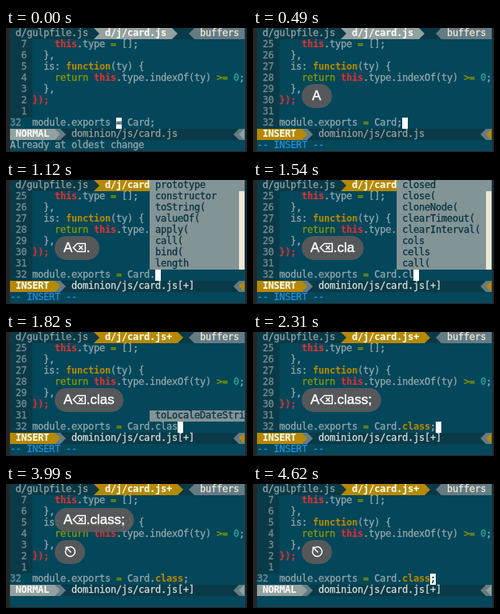
An HTML page with a canvas that plays this animation: 302x155 px, repeating every 4830 ms.

```html
<!DOCTYPE html>
<html lang="en">
<head>
<meta charset="utf-8">
<title>Vim session</title>
<style>
html, body { margin: 0; width: 100%; height: 100%; overflow: hidden; background: #262626; }
canvas { display: block; width: 302px; height: 155px; }
</style>
</head>
<body>
<canvas id="stage" width="302" height="155"></canvas>
<script>
const ctx = document.getElementById('stage').getContext('2d');
const LOOP = 4830, LEFT = 5, CW = 7, CH = 14, BASE = 10;
const MONO = '12px "DejaVu Sans Mono", monospace';
const SANS = '17px "Liberation Sans", Arial, sans-serif';
const C = {
  frame: '#262626', bg: '#04465a', dark: '#0a3a48', text: '#93a7a9', dim: '#748b91', white: '#fdfbf2',
  grey: '#93a1a1', slate: '#657b83', yellow: '#b58900', red: '#e0322f',
  green: '#8a9c00', cyan: '#2aa198', blue: '#268bd2', menu: '#839496', cream: '#eee8d5'
};

// Source lines: runs of [text, colour, bold]
const CODE = [
  [['    '], ['this', C.red, true], ['.type '], ['=', C.green], [' [];']],
  [['  },']],
  [['  is: '], ['function', C.yellow, true], ['(ty) {']],
  [['    '], ['return ', C.green], ['this', C.red, true], ['.type.indexOf(ty) '], ['>=', C.green], [' '], ['0', C.cyan], [';']],
  [['  },']],
  [['});', C.red, true]],
  [['']]
];

const MEMBERS = ['prototype', 'constructor', 'toString(', 'valueOf(', 'apply(', 'call(', 'bind(', 'length'];
const MATCH_C = ['closed', 'close(', 'constructor', 'cloneNode(', 'concat(', 'cols', 'cells', 'call('];
const MATCH_CL = ['closed', 'close(', 'cloneNode(', 'clearTimeout(', 'clearInterval(', 'cols', 'cells', 'call('];
const MATCH_CLA = ['clearTimeout(', 'clearInterval(', 'toLocaleString(', 'toLocaleDateStr', 'toLocaleTimeStr',
  'toLocaleLowerCa', 'toLocaleUpperCa', 'localeCompare('];

const menu = (col, width, ...items) => ({ col, width, items });

// Editor state: each step overrides what came before it
const STEPS = [
  [0, { insert: false, relative: true, changed: false, tail: 'Card;', cursor: 15, message: 'Already at oldest change', keys: '', menu: null }],
  [490, { insert: true, relative: false, cursor: 22, message: '-- INSERT --', keys: 'A' }],
  [700, { keys: 'A⌫' }],
  [770, { changed: true, tail: 'Card', cursor: 21 }],
  [840, { menu: menu(20, 16, 'Card') }],
  [1120, { keys: 'A⌫.', tail: 'Card.', cursor: 22, menu: menu(25, 17, ...MEMBERS) }],
  [1260, { keys: 'A⌫.c' }],
  [1330, { tail: 'Card.c', cursor: 23, menu: menu(25, 17, ...MATCH_C) }],
  [1470, { keys: 'A⌫.cl' }],
  [1540, { keys: 'A⌫.cla', tail: 'Card.cl', cursor: 24, menu: menu(25, 17, ...MATCH_CL) }],
  [1610, { tail: 'Card.cla', cursor: 25, menu: menu(25, 17, ...MATCH_CLA) }],
  [1750, { keys: 'A⌫.clas' }],
  [1820, { tail: 'Card.clas', cursor: 26, menu: menu(25, 17, 'toLocaleDateStri') }],
  [1960, { keys: 'A⌫.class', tail: 'Card.class', cursor: 27, menu: null }],
  [2310, { keys: 'A⌫.class;', tail: 'Card.class;', cursor: 28 }],
  [2870, { escape: true }],
  [2940, { cursor: 27, message: '' }],
  [3990, { insert: false, relative: true, cursor: -1 }],
  [4060, { cursor: 27 }]
];

const stateAt = t => Object.assign({}, ...STEPS.filter(s => s[0] <= t).map(s => s[1]));
const colX = col => LEFT + col * CW;

function block(col, row, width, color, height = 1) {
  ctx.fillStyle = color;
  ctx.fillRect(colX(col), row * CH, width * CW, height * CH);
}

// A thin outline gives glyphs the weight of smoothed text
function glyph(ch, x, y, weight) {
  ctx.lineWidth = weight;
  ctx.fillText(ch, x, y);
  ctx.strokeText(ch, x, y);
}

function put(text, col, row, color = C.text, bold = false) {
  ctx.font = (bold ? 'bold ' : '') + MONO;
  ctx.fillStyle = ctx.strokeStyle = color;
  [...text].forEach((ch, i) => {
    if (ch !== ' ') glyph(ch, colX(col + i), row * CH + BASE, bold ? 0.1 : 0.3);
  });
}

function putRuns(runs, col, row) {
  for (const [text, color, bold] of runs) {
    put(text, col, row, color, bold);
    col += text.length;
  }
}

// Powerline separator: dir 1 points right, -1 points left
function arrow(col, row, dir, color, back) {
  block(col, row, 1, back);
  const base = colX(dir > 0 ? col : col + 1), y = row * CH;
  ctx.fillStyle = color;
  ctx.beginPath();
  ctx.moveTo(base, y);
  ctx.lineTo(base + dir * CW, y + CH / 2);
  ctx.lineTo(base, y + CH);
  ctx.fill();
}

function drawTabs(s) {
  const name = 'd/j/card.js' + (s.changed ? '+' : '');
  const color = s.changed ? C.yellow : C.grey;
  const end = 18 + name.length;
  block(0, 0, 42, C.dark);
  put('d/gulpfile.js', 1, 0, C.grey);
  arrow(15, 0, 1, C.dark, color);
  block(16, 0, end - 16, color);
  put(name, 17, 0, C.white, true);
  arrow(end, 0, 1, color, C.dark);
  arrow(32, 0, -1, C.slate, C.dark);
  block(33, 0, 9, C.slate);
  put('buffers', 34, 0, C.cream);
}

function drawCode(s) {
  block(0, 1, 4, C.dark, s.relative ? 7 : 8);
  for (let row = 1; row < 8; row++) {
    const n = s.relative ? 8 - row : 24 + row;
    put(String(n).padStart(3), 0, row, C.dim);
    putRuns(CODE[row - 1], 4, row);
  }
  // With relative numbers the current line is left-aligned
  put('32', s.relative ? 0 : 1, 8, C.dim);

  const lead = 'module.exports = ';
  const [head, rest] = s.tail.split('class');
  const runs = [['module.exports '], ['=', C.green], [' ' + head]];
  if (rest !== undefined) runs.push(['class', C.yellow, true], [rest]);
  putRuns(runs, 4, 8);
  if (s.cursor >= 0) {
    block(4 + s.cursor, 8, 1, '#ffffff');
    put((lead + s.tail)[s.cursor] || ' ', 4 + s.cursor, 8, C.dark);
  }
}

function drawStatus(s) {
  const color = s.insert ? C.yellow : C.grey;
  block(0, 9, 42, C.dark);
  block(0, 9, 8, color);
  put(s.insert ? 'INSERT' : 'NORMAL', 1, 9, C.white, true);
  arrow(8, 9, 1, color, C.slate);
  arrow(9, 9, 1, C.slate, C.dark);
  put('dominion/js/card.js' + (s.changed ? '[+]' : ''), 11, 9, s.changed ? '#d3dcd6' : C.grey);
  arrow(40, 9, -1, C.slate, C.dark);
  arrow(41, 9, -1, color, C.slate);
  put(s.message, 0, 10, s.insert ? C.blue : C.text);
}

function drawMenu({ col, width, items }) {
  const top = 8 - items.length;
  block(col, top, width, C.menu, items.length);
  items.forEach((item, i) => put(item, col + 1, top + i, '#0a3440'));
  // Scrollbar track below a one-row thumb
  if (items.length > 1) block(col + width - 1, top + 1, 1, C.cream, items.length - 1);
}

function strokePath(points) {
  ctx.beginPath();
  points.forEach(([x, y]) => ctx.lineTo(x, y));
  ctx.stroke();
}

function drawDelete(x, y) {
  ctx.lineWidth = 1.5;
  strokePath([[x + 1, y], [x + 6, y - 5], [x + 16, y - 5], [x + 16, y + 5], [x + 6, y + 5], [x + 1, y], [x + 2, y - 1]]);
  strokePath([[x + 8, y - 2.5], [x + 13, y + 2.5]]);
  strokePath([[x + 13, y - 2.5], [x + 8, y + 2.5]]);
}

function drawEscape(x, y) {
  ctx.lineWidth = 1.5;
  ctx.beginPath();
  ctx.arc(x, y, 6, -Math.PI * 0.56, Math.PI * 1.06);
  ctx.stroke();
  strokePath([[x + 1, y + 1], [x - 5, y - 5]]);
  strokePath([[x - 5.3, y - 1], [x - 5.3, y - 5.3], [x - 1, y - 5.3]]);
}

function bubble(y, width, alpha, content) {
  ctx.save();
  ctx.globalAlpha = alpha;
  ctx.fillStyle = 'rgba(96, 92, 91, 0.88)';
  ctx.beginPath();
  ctx.roundRect(61, y, width, 30, 15);
  ctx.fill();
  ctx.font = SANS;
  ctx.fillStyle = ctx.strokeStyle = '#ffffff';
  content();
  ctx.restore();
}

function drawKeys(s, t) {
  const fade = t < 4410 ? 1 : Math.max(0, 0.75 - Math.floor((t - 4410) / 70) * 0.25);
  if (s.keys && fade) {
    ctx.font = SANS;
    const advance = ch => ch === '⌫' ? 17.5 : ctx.measureText(ch).width;
    const width = [...s.keys].reduce((sum, ch) => sum + advance(ch), 22.5);
    const y = s.escape ? 30 : 70;
    bubble(y, Math.max(38, width), fade, () => {
      let x = s.keys.length > 1 ? 72 : 74;
      for (const ch of s.keys) {
        if (ch === '⌫') drawDelete(x, y + 14.5);
        else glyph(ch, x, y + 20, 0.4);
        x += advance(ch);
      }
    });
  }
  if (s.escape) bubble(70, 38, 1, () => drawEscape(80.5, 84.5));
}

function frame(now) {
  const t = now % LOOP;
  const s = stateAt(t);
  ctx.fillStyle = C.frame;
  ctx.fillRect(0, 0, 302, 155);
  ctx.fillStyle = C.bg;
  ctx.fillRect(LEFT, 0, 295, 154);
  drawTabs(s);
  drawCode(s);
  drawStatus(s);
  if (s.menu) drawMenu(s.menu);
  drawKeys(s, t);
}

const start = performance.now();
function tick() {
  frame(performance.now() - start);
  requestAnimationFrame(tick);
}
tick();
</script>
</body>
</html>
```
